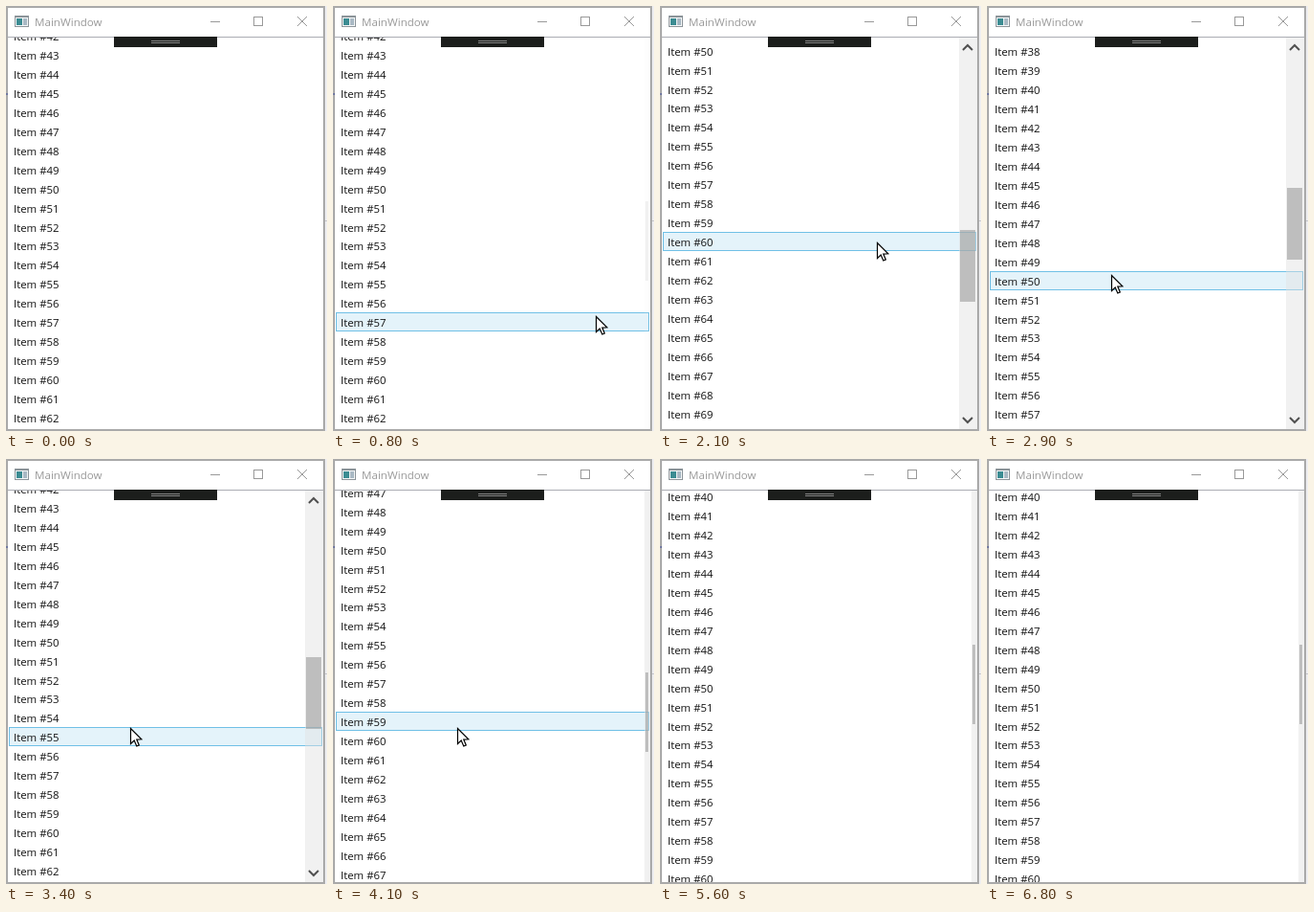
Recreate the animation shown at these times as an HTML page with a canvas. Size 336 px wide and 444 px high, loop 7100 ms.

```html
<!DOCTYPE html>
<html lang="en">
<head>
<meta charset="utf-8">
<title>MainWindow</title>
<style>
html, body { margin: 0; width: 336px; height: 444px; overflow: hidden; }
canvas { display: block; }
</style>
</head>
<body>
<canvas id="stage" width="336" height="444"></canvas>
<script>
const ctx = document.getElementById('stage').getContext('2d');
const LOOP = 7100, STEP = 100;
const FONT = '"Open Sans", "Noto Sans", sans-serif';

// Pointer path: time, x, y
const path = [
  [100, 337, 372], [700, 275, 324], [900, 275, 324], [1800, 227, 247],
  [2200, 227, 247], [2700, 130, 281], [4150, 130, 281],
  [4700, 24, 307], [4800, 24, 307], [5200, -14, 312]
];

// Wheel notches: time, direction
const wheel = [
  [1300, 1], [1500, 1], [1800, 1],
  [2300, -1], [2400, -1], [2500, -1], [2700, -1], [2800, -1],
  [3100, 1], [3300, 1], [3500, 1], [3700, 1],
  [4300, -1], [4400, -1], [4600, -1]
];

const lerp = (a, b, k) => a + (b - a) * k;
const ramp = (t, from, to) => {
  const k = Math.min(1, Math.max(0, (t - from) / (to - from)));
  return k * k * (3 - 2 * k);
};

function rect(color, x, y, w, h) {
  ctx.fillStyle = color;
  ctx.fillRect(x, y, w, h);
}

function text(str, x, y, size, color) {
  ctx.font = `${size}px ${FONT}`;
  ctx.fillStyle = color;
  ctx.fillText(str, x, y);
}

function line(color, ...points) {
  ctx.strokeStyle = color;
  ctx.beginPath();
  points.forEach(([x, y]) => ctx.lineTo(x, y));
  ctx.stroke();
}

function pointerAt(t) {
  const i = path.findIndex(p => p[0] > t);
  if (i < 1) return null;
  const [a, b] = [path[i - 1], path[i]];
  const k = ramp(t, a[0], b[0]);
  return [Math.round(lerp(a[1], b[1], k)), Math.round(lerp(a[2], b[2], k))];
}

function drawChrome() {
  rect('#ededf0', 0, 0, 336, 444);
  rect('#a9a9a9', 0, 0, 334, 444);
  rect('#fff', 2, 2, 330, 440);
  rect('#abadb3', 2, 32, 330, 1);
  rect('#7078a0', 0, 91, 2, 2);
  rect('#c4c4c8', 334, 224, 2, 1);

  rect('#8c9499', 9, 10, 15, 12);
  rect('#f4f6f7', 10, 12, 13, 9);
  rect('#3b8c92', 11, 13, 6, 7);
  rect('#a9b9c4', 18, 13, 4, 7);
  text('MainWindow', 30, 21, 11.6, '#999');

  line('#999', [214, 16.5], [224, 16.5]);
  ctx.strokeRect(259.5, 11.5, 9, 9);
  line('#999', [305, 11], [315, 21]);
  line('#999', [315, 11], [305, 21]);
}

function drawList(scroll, pointer) {
  ctx.save();
  ctx.beginPath();
  ctx.rect(2, 33, 330, 409);
  ctx.clip();
  for (let i = 35; i < 75; i++) {
    // Rows are 19.96 px high, snapped to whole pixels
    const top = 20 * i - Math.floor((i + 22) / 25) - scroll - 15;
    if (top < 10 || top > 444) continue;
    if (pointer && pointer[0] > 2 && pointer[0] < 331 &&
        pointer[1] >= top && pointer[1] < top + 20) {
      rect('#e4f3fa', 3, top, 328, 20);
      ctx.strokeStyle = '#70c0e6';
      ctx.strokeRect(3.5, top + 0.5, 327, 19);
    }
    text('Item #' + i, 8, top + 15, 11.4, '#111');
  }
  ctx.restore();
}

function drawScrollbar(t, notch) {
  const show = ramp(t, 720, 1000);
  const wide = ramp(t, 1000, 1200) - ramp(t, 3700, 3900);
  ctx.globalAlpha = show;
  const left = lerp(326, 313, wide);
  rect('rgba(225,225,225,.45)', left, 33, 332 - left, 409);
  const x = lerp(327, 314, wide);
  const y = lerp(203.7 + 9.67 * notch, 207.4 + 8.7 * notch, wide);
  rect('rgba(150,150,150,.55)', x, Math.round(y), 330 - x, Math.round(lerp(83, 75, wide)));
  ctx.globalAlpha = show * wide;
  ctx.lineWidth = 2;
  line('#505050', [317, 46], [322, 41], [327, 46]);
  line('#505050', [317, 430], [322, 435], [327, 430]);
  ctx.lineWidth = 1;
  ctx.globalAlpha = 1;
}

function drawHandle() {
  rect('#1c1e1c', 113, 32, 108, 11);
  rect('#858585', 152, 36, 30, 1);
  rect('#858585', 152, 38, 30, 1);
}

function drawPointer([x, y]) {
  ctx.save();
  ctx.translate(x + 0.5, y + 0.5);
  ctx.beginPath();
  [[0, 0], [0, 16], [3.7, 12.5], [6.3, 18.5], [8.8, 17.4], [6.3, 11.6], [11.3, 11.3]]
    .forEach(([px, py]) => ctx.lineTo(px, py));
  ctx.closePath();
  ctx.fillStyle = '#fff';
  ctx.fill();
  ctx.strokeStyle = '#000';
  ctx.lineWidth = 1.2;
  ctx.stroke();
  ctx.restore();
}

function draw(now) {
  const t = Math.floor((now % LOOP) / STEP) * STEP;
  const notch = wheel.reduce((sum, [at, dir]) => sum + (t >= at ? dir : 0), 0);
  const pointer = pointerAt(t);
  drawChrome();
  drawList(802 + 48 * notch, pointer);
  drawScrollbar(t, notch);
  drawHandle();
  if (pointer) drawPointer(pointer);
}

const start = performance.now();
function frame() {
  draw(performance.now() - start);
  requestAnimationFrame(frame);
}
frame();
</script>
</body>
</html>
```
